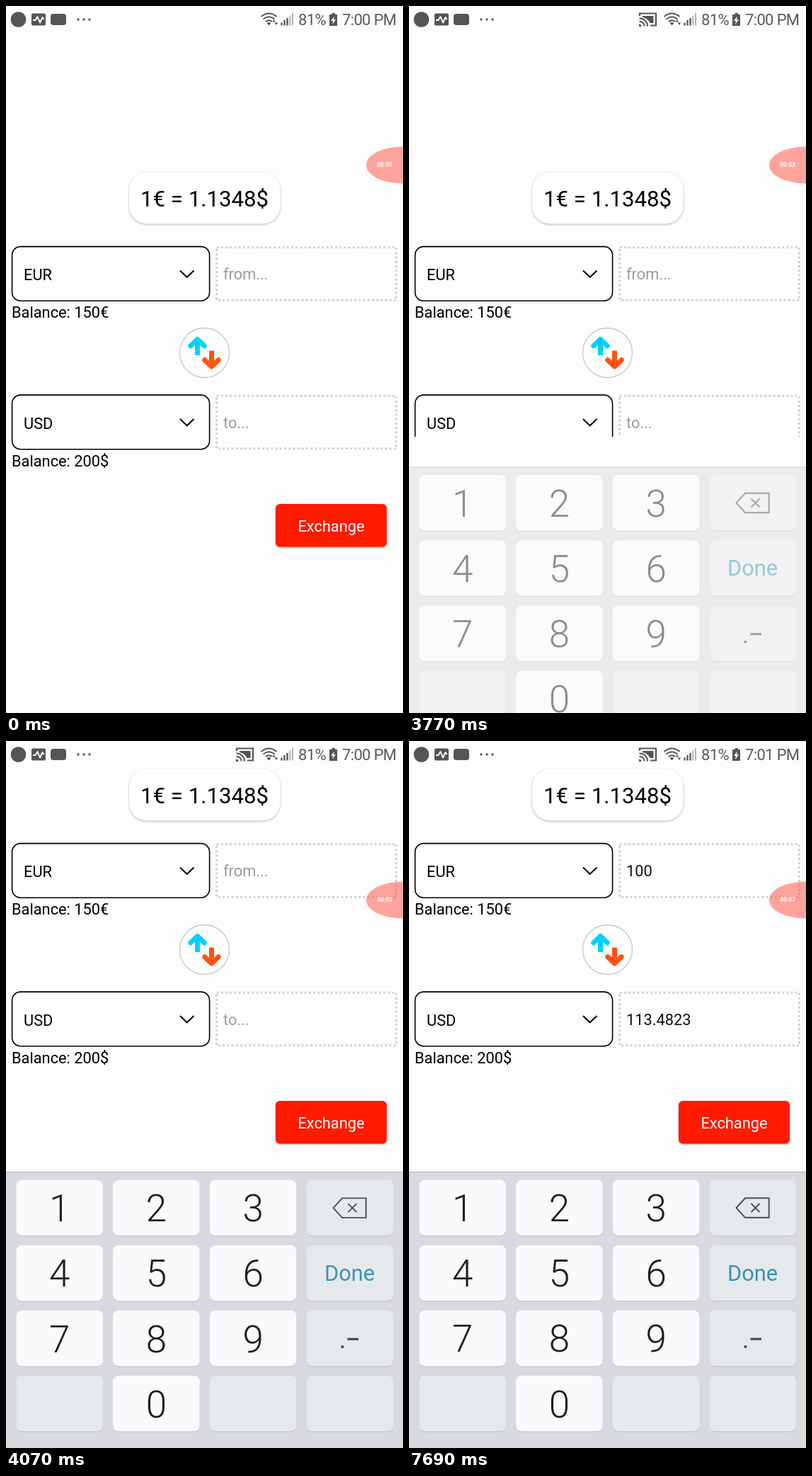
Recreate the animation shown at these times as an HTML page. Size 561 by 998 pixels, loop 8 s.

```html
<!DOCTYPE html>
<html lang="en">
<head>
<meta charset="utf-8">
<title>Currency exchange</title>
<style>
  html, body { margin: 0; width: 100%; height: 100%; overflow: hidden; background: #fdfdfd; }
  svg { display: block; width: 100%; height: 100%; }
  text { font-family: Roboto, sans-serif; font-size: 21.8px; white-space: pre; }
  .mid { text-anchor: middle; }
  .status { font-size: 22px; letter-spacing: -.65px; fill: #5a5a5a; }
  .digit { font-size: 53px; font-weight: 300; fill: #1d1d1f; }
  .card { filter: drop-shadow(0 1.5px 1.8px rgba(0,0,0,.3)); }
  .key { filter: drop-shadow(0 1px .6px rgba(0,0,0,.13)); }
</style>
</head>
<body>
<svg id="stage" viewBox="0 0 561 998" preserveAspectRatio="none"></svg>
<script>
const LOOP = 8000;
const SHIFT = 195;
const KEYS_TOP = 608;
const RATE = 1.134823;
const DIGIT_W = 12.3;

const rect = (x, y, w, h, r, attrs) =>
  `<rect x="${x}" y="${y}" width="${w}" height="${h}" rx="${r}" ${attrs}/>`;
const path = (d, stroke, width, attrs = '') =>
  `<path d="${d}" fill="none" stroke="${stroke}" stroke-width="${width}" ${attrs}/>`;
const text = (x, y, str, attrs = '') => `<text x="${x}" y="${y}" ${attrs}>${str}</text>`;

function statusBar() {
  const ink = '#555';
  const dots = [102, 110, 118].map(x => `<circle cx="${x}" cy="19" r="1.7" fill="${ink}"/>`).join('');
  return `
    <circle cx="17.5" cy="19" r="10.8" fill="${ink}"/>
    ${rect(36, 10.5, 20, 17, 2, `fill="${ink}"`)}
    ${path('M38 20h3.500l3-5 3.500 8.500 3.500-7.500 2 3', '#fff', 1.9, 'stroke-linejoin="round"')}
    ${rect(63, 11, 22, 16, 4, `fill="${ink}"`)}
    ${dots}
    <g id="cast">
      ${path('M326 14V10.500H349V27.500H341', ink, 2.2)}
      <path d="M330 14H345.500V24H340.500Q337.500 17.500 330 16Z" fill="${ink}"/>
      ${path('M325.500 17.500A11 11 0 0 1 337 28.500M325.500 21.700A7 7 0 0 1 332.700 28.500', ink, 2.1)}
      <path d="M325 25.500a3.500 3.500 0 0 1 3.500 3.500H325Z" fill="${ink}"/>
    </g>
    ${path('M360.500 15Q371.500 6 382.500 15M363.500 18.500Q371.500 12 379.500 18.500M366.800 22Q371.500 18.500 376 22', ink, 2)}
    <path d="M368.500 24Q371.500 22 374.500 24L371.500 27.500Z" fill="${ink}"/>
    <path d="M376.500 22.500l2.200-3.500 2.200 3.500ZM379.700 23.500h4.400l-2.200 3.500Z" fill="${ink}"/>
    ${path('M389.500 23.500V27.500M393.500 20V27.500M397.500 17V27.500', ink, 2.3)}
    ${path('M401.300 13.500V27.500M405 10V27.500', '#b0b0b0', 2)}
    ${text(413, 27.3, '81%', 'class="status"')}
    <path d="M460.500 10h4.500v2h3v16h-11V12h3.500Z" fill="${ink}"/>
    <path d="M464 14.500l-5 6.500h3l-1 5 5-6.800h-3Z" fill="#fff"/>
    ${text(475, 27.3, '', 'id="clock" class="status"')}`;
}

function currencyRow(y, code, balance, id) {
  return `<g transform="translate(0 ${y})">
    ${rect(8.6, .6, 279, 76.6, 12, 'fill="none" stroke="#000" stroke-width="1.6"')}
    ${text(25, 48, code)}
    ${path('M246 34.500L255.700 43.800L265.500 34.500', '#000', 2)}
    ${rect(297.6, 1.8, 253.8, 74.4, 0, 'fill="none" stroke="#d2d2d6" stroke-width="3.1" stroke-dasharray="3.1 3.1"')}
    ${text(307, 47.3, '', `id="${id}"`)}
    ${text(8, 101.3, 'Balance: ' + balance)}
  </g>`;
}

function arrow(color, transform) {
  return `<g transform="${transform}">${path('M0 4V26.500', color, 7)}
    ${path('M-9.700 13.300L0 4L9.700 13.300', color, 7, 'stroke-linecap="round" stroke-linejoin="round"')}</g>`;
}

function form() {
  return `
    <g class="card">${rect(174, 234.5, 213.5, 73, 25, 'fill="#fff"')}</g>
    ${text(280.6, 283.2, '1€ = 1.1348$', 'class="mid" style="font-size:31.2px"')}
    ${currencyRow(339, 'EUR', '150€', 'from')}
    <circle cx="280.5" cy="489.5" r="35" fill="#fdfdfd" stroke="#c8c8c8" stroke-width="1.3"/>
    ${arrow('#00d2ff', 'translate(270.5 466.500)')}
    ${arrow('#ff5214', 'translate(290.500 513) scale(1 -1)')}
    ${currencyRow(548.5, 'USD', '200$', 'to')}
    <g class="card">${rect(381, 703, 157, 60.5, 6, 'fill="#ff1a00"')}</g>
    ${text(459.5, 741.6, 'Exchange', 'class="mid" fill="#fff"')}
    <rect id="caret" y="363" width="3.2" height="30" fill="#00bfc8"/>`;
}

function keyboard() {
  const labels = ['1', '2', '3', '', '4', '5', '6', '', '7', '8', '9', '', '', '0', '', ''];
  const keys = labels.map((label, i) => {
    const x = 14.4 + (i % 4) * 136.7;
    const y = 619.6 + Math.floor(i / 4) * 92.1;
    const id = label ? `id="key${label}"` : '';
    return `<g class="key">${rect(x, y, 122.6, 78.6, 8, `${id} fill="${label ? '#fafafc' : '#e6e9eb'}"`)}</g>` +
      text(x + 61.3, y + 58.6, label, 'class="mid digit"');
  }).join('');
  return `
    ${rect(0, KEYS_TOP, 561, 470, 0, 'fill="#d9dadf"')}
    ${rect(0, KEYS_TOP, 561, 1, 0, 'fill="#aeafb3"')}
    ${keys}
    ${path('M462.500 659L475 645.300H508.700V672.800H475Z', '#4a4d50', 1.9)}
    ${path('M483.500 653L495.500 665M495.500 653L483.500 665', '#4a4d50', 1.9)}
    ${text(485.6, 762, 'Done', 'class="mid" fill="#3a93ba" style="font-size:30.8px"')}
    ${rect(473.6, 853.2, 3.6, 3.6, .5, 'fill="#45484b"')}
    ${rect(482.5, 842.6, 15.5, 3.1, 0, 'fill="#45484b"')}`;
}

const stage = document.getElementById('stage');
stage.innerHTML = `
  <clipPath id="window"><rect id="pane" width="561" height="998"/></clipPath>
  ${rect(0, 0, 561, 998, 0, 'fill="#fdfdfd"')}
  <g clip-path="url(#window)"><g id="form">${form()}</g></g>
  ${statusBar()}
  <g id="keyboard">${keyboard()}</g>
  <path d="M561 198.500A52 26 0 0 0 561 250.500Z" fill="#ff4a3c" fill-opacity=".5"/>
  ${text(535, 227.4, '', 'id="timer" class="mid" fill="#fff" style="font-size:8.3px;font-weight:700"')}`;

const ui = {};
stage.querySelectorAll('[id]').forEach(el => { ui[el.id] = el; });

const CARET_FLIPS = [740, 1280, 1790, 2300, 2800, 3300, 4170, 4660, 5170, 6560, 7040, 7560];
const SECONDS = [1330, 2330, 3330, 4740, 5700, 6710, 7690];
const PRESSES = [
  { key: '1', down: 5290, up: 5390, type: 5400 },
  { key: '0', down: 5700, up: 5800, type: 5790 },
  { key: '0', down: 5930, up: 6030, type: 6020 }
];
const KEYS_IN = { start: 3700, slide: 420, fade: 140, drop: 74 };

const passed = (times, t) => times.filter(at => t >= at).length;
const show = (el, on) => el.setAttribute('visibility', on ? 'visible' : 'hidden');
const clamp = v => Math.min(1, Math.max(0, v));

function setField(el, value, hint) {
  el.textContent = value || hint;
  el.setAttribute('fill', value ? '#111' : '#9b9b9b');
}

function render(t) {
  const typed = PRESSES.filter(p => t >= p.type).map(p => p.key).join('');
  setField(ui.from, typed, 'from...');
  setField(ui.to, typed && String(+(typed * RATE).toFixed(6)), 'to...');

  show(ui.caret, passed(CARET_FLIPS, t) % 2 === 1);
  ui.caret.setAttribute('x', 307.2 + typed.length * DIGIT_W);

  show(ui.cast, t >= 100);
  ui.clock.textContent = t < 4700 ? '7:00 PM' : '7:01 PM';
  ui.timer.textContent = '00:0' + passed(SECONDS, t);

  const since = t - KEYS_IN.start;
  const drop = KEYS_IN.drop * (1 - clamp(since / KEYS_IN.slide)) ** 3;
  ui.keyboard.setAttribute('transform', `translate(0 ${drop})`);
  ui.keyboard.setAttribute('opacity', clamp(since / KEYS_IN.fade));
  ui.pane.setAttribute('height', since < 30 ? 998 : KEYS_TOP);
  ui.form.setAttribute('transform', `translate(0 ${since < 100 ? 0 : -SHIFT})`);

  for (const key of ['1', '0']) {
    const held = PRESSES.some(p => p.key === key && t >= p.down && t < p.up);
    ui['key' + key].setAttribute('fill', held ? '#c9cdd2' : '#fafafc');
  }
}

const begin = performance.now();
function tick() {
  render((performance.now() - begin) % LOOP);
  requestAnimationFrame(tick);
}
tick();
</script>
</body>
</html>
```
